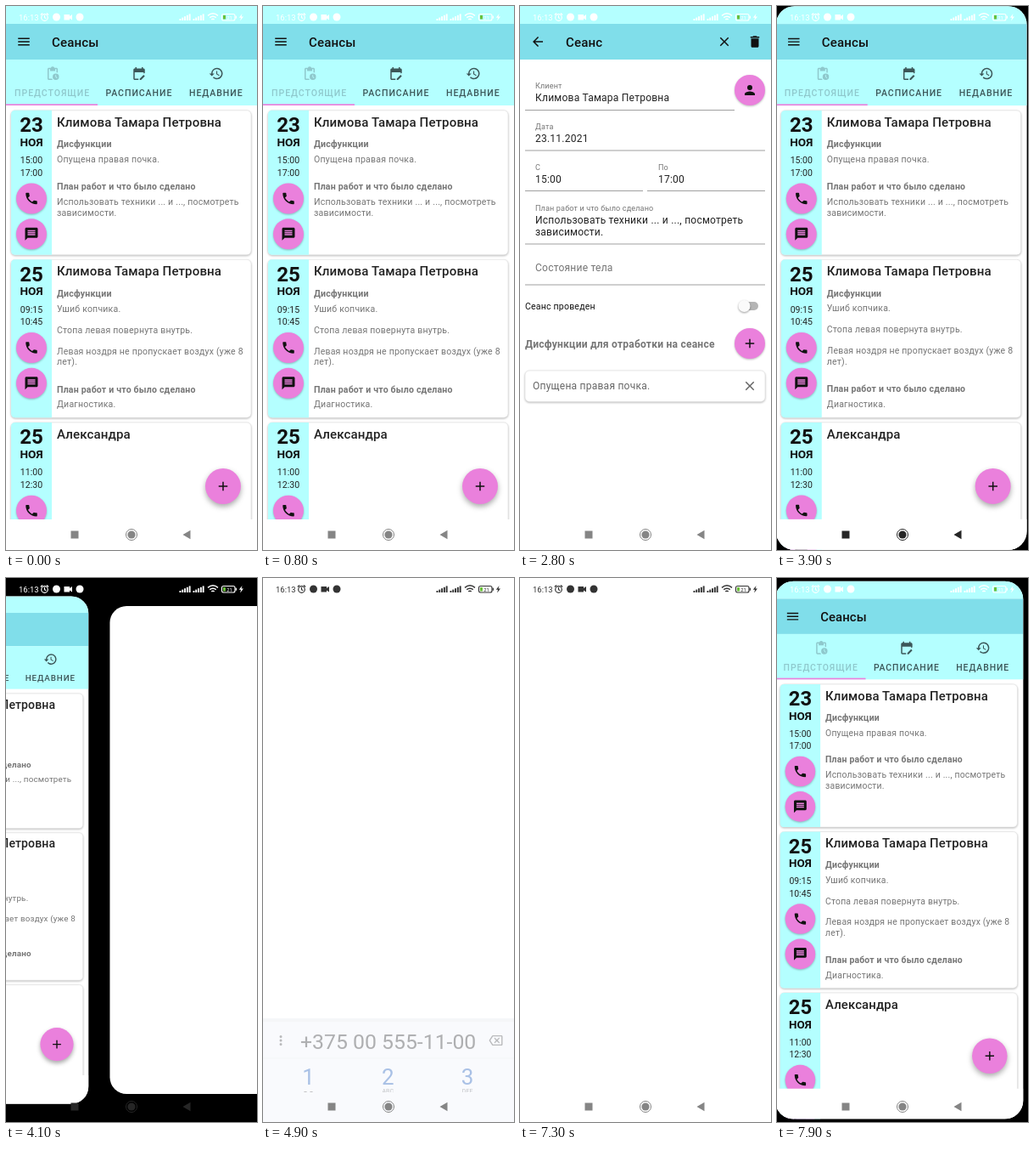
Animation, 296 px wide and 640 px high, one loop 8 s. Source, as an HTML page:

```html
<!DOCTYPE html>
<html lang="ru">
<head>
<meta charset="utf-8">
<title>Сеансы</title>
<style>
  html, body { margin: 0; width: 100%; height: 100%; overflow: hidden; background: #000; }
  #stage { position: relative; width: 296px; height: 640px; overflow: hidden; background: #000; }
  .window { position: absolute; inset: 0; overflow: hidden; background: #fff; }
  svg { position: absolute; left: 0; top: 0; }
  text { font-family: Roboto, sans-serif; letter-spacing: .018em; white-space: pre; }
  .plain, .mid { letter-spacing: 0; }
  .mid { text-anchor: middle; }
  .bold { font-weight: 700; }
  .title { font-weight: 500; letter-spacing: .0075em; }
  .tab { font-weight: 500; letter-spacing: .089em; }
  .card { fill: #fff; stroke: #ddd; stroke-width: .6; filter: drop-shadow(0 1px 1px #0004); }
  .round { fill: #ea80dc; filter: drop-shadow(0 1px 1px #0004); }
  .fab { filter: drop-shadow(0 3px 3px #0005); }
</style>
</head>
<body>
<div id="stage">
  <div class="window" id="app">
    <svg id="list" width="296" height="640"></svg>
    <svg id="session" width="296" height="640"></svg>
  </div>
  <div class="window" id="dialer"><svg id="dial" width="296" height="640"></svg></div>
  <svg id="system" width="296" height="640"></svg>
</div>
<script>
const LOOP = 8000, SHRINK = .105;
const CYAN = '#80deea', LIGHT = '#b4ffff', PINK = '#ea80dc', GREY = '#757575', BLUE = '#1a5abc';
const SMALL = 10.55, BODY = 12.06, TITLE = 15.07;
const CLIENT = 'Климова Тамара Петровна';
const PLAN = ['Использовать техники ... и ..., посмотреть', 'зависимости.'];
const PLAN_LABEL = 'План работ и что было сделано';

const ICONS = {
  call: 'M6.62 10.79c1.44 2.83 3.76 5.14 6.59 6.59l2.2-2.2c.27-.27.67-.36 1.02-.24 1.12.37 2.33.57 3.57.57.55 0 1 .45 1 1V20c0 .55-.45 1-1 1-9.39 0-17-7.61-17-17 0-.55.45-1 1-1h3.5c.55 0 1 .45 1 1 0 1.25.2 2.45.57 3.57.11.35.03.74-.25 1.02z',
  chat: 'M20 2H4c-1.1 0-2 .9-2 2v18l4-4h14c1.1 0 2-.9 2-2V4c0-1.1-.9-2-2-2zm-2 12H6v-2h12zm0-3H6V9h12zm0-3H6V6h12z',
  chatLine: 'M4 4h16v12H5.2L4 17.2zM4 2c-1.1 0-2 .9-2 2v18l4-4h14c1.1 0 2-.9 2-2V4c0-1.1-.9-2-2-2zM6 12h12v2H6zm0-3h12v2H6zm0-3h12v2H6z',
  menu: 'M3 18h18v-2H3zm0-5h18v-2H3zm0-7v2h18V6z',
  back: 'M20 11H7.83l5.59-5.59L12 4l-8 8 8 8 1.41-1.41L7.83 13H20z',
  close: 'M19 6.41 17.59 5 12 10.59 6.41 5 5 6.41 10.59 12 5 17.59 6.41 19 12 13.41 17.59 19 19 17.59 13.41 12z',
  trash: 'M6 19c0 1.1.9 2 2 2h8c1.1 0 2-.9 2-2V7H6zM19 4h-3.5l-1-1h-5l-1 1H5v2h14z',
  person: 'M12 12a4 4 0 1 0 0-8 4 4 0 0 0 0 8zm0 2c-2.67 0-8 1.34-8 4v2h16v-2c0-2.66-5.33-4-8-4z',
  addPerson: 'M9 4a4 4 0 1 0 0 8 4 4 0 0 0 0-8zm0 2a2 2 0 1 1 0 4 2 2 0 0 1 0-4zM1 20v-2c0-2.66 5.33-4 8-4s8 1.34 8 4v2zm2-2h12c-.2-.7-3.3-2-6-2s-5.8 1.3-6 2zM18 7h2v3h3v2h-3v3h-2v-3h-3v-2h3z',
  plus: 'M19 13h-6v6h-2v-6H5v-2h6V5h2v6h6z',
  history: 'M13 3a9 9 0 0 0-9 9H1l4 4 4-4H6a7 7 0 1 1 2.06 4.94l-1.42 1.42A9 9 0 1 0 13 3zm-1 5v5l4.28 2.54.72-1.21-3.5-2.08V8z',
  calendar: 'M19 4h-1V2h-2v2H8V2H6v2H5c-1.1 0-2 .9-2 2v14c0 1.1.9 2 2 2h6v-2H5V10h14v2l2-1V6c0-1.1-.9-2-2-2zM13 20l6-6 2 2-6 6h-2z',
  pending: 'M17 12a5 5 0 1 0 0 10 5 5 0 0 0 0-10zm1.65 7.35L16.5 17.2V14h1v2.79l1.85 1.85zM18 3h-3.18a3 3 0 0 0-5.64 0H6c-1.1 0-2 .9-2 2v15c0 1.1.9 2 2 2h6.11A6.7 6.7 0 0 1 10.68 20H6V5h2v3h8V5h2v5.08c.71.1 1.38.31 2 .6V5c0-1.1-.9-2-2-2z',
  erase: 'M22 3H7c-.7 0-1.2.35-1.6.9L0 12l5.4 8.1c.4.5.9.9 1.6.9h15c1.1 0 2-.9 2-2V5c0-1.1-.9-2-2-2zm0 16H7.07L2.4 12l4.66-7H22zm-11.6-2 3.6-3.6 3.6 3.6 1.4-1.4-3.6-3.6L19 8.4 17.6 7 14 10.6 10.4 7 9 8.4l3.6 3.6L9 15.6z',
  dots: 'M12 8a2 2 0 1 0 0-4 2 2 0 0 0 0 4zm0 2a2 2 0 1 0 0 4 2 2 0 0 0 0-4zm0 6a2 2 0 1 0 0 4 2 2 0 0 0 0-4z',
};

const $ = id => document.getElementById(id);
const text = (x, y, size, str, fill = '#222', cls = '') =>
  `<text x="${x}" y="${y}" font-size="${size}" fill="${fill}" class="${cls}">${str}</text>`;
const rect = (x, y, w, h, fill, extra = '') =>
  `<rect x="${x}" y="${y}" width="${w}" height="${h}" fill="${fill}" ${extra}/>`;
const icon = (name, x, y, fill = '#111', size = 18) =>
  `<path d="${ICONS[name]}" fill="${fill}" transform="translate(${x - size / 2} ${y - size / 2}) scale(${size / 24})"/>`;
const button = (name, x, y, r = 18, cls = '') =>
  `<circle class="round ${cls}" cx="${x}" cy="${y}" r="${r}"/>` + icon(name, x, y);
const cardBox = (y, h) => `<rect class="card" x="6" y="${y}" width="283" height="${h}" rx="5"/>`;
const toolbar = (name, title) => rect(0, 0, 296, 21, LIGHT) + rect(0, 21, 296, 42, CYAN) +
  icon(name, 21, 42) + text(54, 48, TITLE, title, '#111', 'title');

// Session list
function sessionCard(top, height, day, from, to, name, notes = []) {
  const column = `<path fill="${LIGHT}" d="M54 ${top}H11q-5 0-5 5v${height - 10}q0 5 5 5h43z"/>`;
  const lines = notes.map(([dy, str, cls]) => text(60, top + dy + 3.7, SMALL, str, GREY, cls));
  return cardBox(top, height) + column +
    text(30, top + 25.3, 24.1, day, '#111', 'mid bold') +
    text(30, top + 42, 13.56, 'НОЯ', '#111', 'mid bold') +
    text(30, top + 62.4, SMALL, from, '#222', 'mid') + text(30, top + 77, SMALL, to, '#222', 'mid') +
    button('call', 30, top + 103.7) + button('chat', 30, top + 145.5) +
    text(60, top + 19, TITLE, name, '#222', 'title') + lines.join('');
}
const tab = (name, label, iconX, x, fill) => icon(name, iconX, 79.5, fill) + text(x, 106.2, SMALL, label, fill, 'tab');

$('list').innerHTML =
  sessionCard(122.8, 170, 23, '15:00', '17:00', CLIENT, [
    [39.5, 'Дисфункции', 'bold'], [57.5, 'Опущена правая почка.'],
    [89.7, PLAN_LABEL, 'bold'], [107.4, PLAN[0]], [120.3, PLAN[1]]]) +
  sessionCard(298.3, 186, 25, '09:15', '10:45', CLIENT, [
    [39.7, 'Дисфункции', 'bold'], [57.5, 'Ушиб копчика.'], [82.5, 'Стопа левая повернута внутрь.'],
    [107.5, 'Левая ноздря не пропускает воздух (уже 8'], [120.3, 'лет).'],
    [152.5, PLAN_LABEL, 'bold'], [170.3, 'Диагностика.']]) +
  sessionCard(490, 180, 25, '11:00', '12:30', 'Александра') +
  rect(0, 604, 296, 36, '#fff') +
  toolbar('menu', 'Сеансы') + rect(0, 63, 296, 54, LIGHT) +
  tab('pending', 'ПРЕДСТОЯЩИЕ', 55, 10, '#8fc8cc') +
  tab('calendar', 'РАСПИСАНИЕ', 157, 117.5, '#3c5658') +
  tab('history', 'НЕДАВНИЕ', 248, 216, '#3c5658') +
  rect(0, 115.3, 108, 1.7, PINK) + button('plus', 256, 565, 21, 'fab');

// Session form
const line = (x1, x2, y) => rect(x1, y - .4, x2 - x1, .8, '#888');
const label = (x, y, str) => text(x, y, 9.04, str, GREY);
const floating = (id, str) => `<g id="${id}">${text(0, 0, BODY, str, GREY)}</g>`;

$('session').innerHTML = rect(0, 0, 296, 640, '#fff') +
  toolbar('back', 'Сеанс') + '<circle id="ripple" cx="21" cy="42"/>' +
  icon('close', 241, 42) + icon('trash', 277, 42) +
  floating('clientLabel', 'Клиент') + `<g id="client">${text(18, 112, BODY, CLIENT)}</g>` +
  line(6, 253, 122.5) + button('person', 271, 99) +
  label(18, 144.8, 'Дата') + text(18, 159.8, BODY, '23.11.2021') + line(6, 289, 170) +
  label(18, 192.6, 'С') + text(18, 207.8, BODY, '15:00') + line(6, 145, 217.5) +
  label(163, 192.6, 'По') + text(163, 207.8, BODY, '17:00') + line(150, 289, 217.5) +
  floating('planLabel', PLAN_LABEL) +
  text(18, 255.8, BODY, PLAN[0]) + text(18, 270, BODY, PLAN[1]) + line(6, 289, 280) +
  text(18, 311.6, BODY, 'Состояние тела', GREY) + line(6, 289, 328) +
  text(6, 356.8, SMALL, 'Сеанс проведен', '#111') +
  rect(259, 348, 22, 10, '#b5b5b5', 'rx="5"') +
  '<circle cx="264.5" cy="353" r="7" fill="#fafafa" style="filter:drop-shadow(0 1px 1px #0006)"/>' +
  text(6, 401.7, BODY, 'Дисфункции для отработки на сеансе', GREY, 'bold') + button('plus', 271, 397) +
  `<g id="item">${cardBox(429, 36.5) + text(15, 451.2, BODY, 'Опущена правая почка.', '#666') + icon('close', 271, 447, '#666')}</g>`;

// Dialer
const LATIN = ['', 'ABC', 'DEF', 'GHI', 'JKL', 'MNO', 'PQRS', 'TUV', 'WXYZ'];
const CYRILLIC = ['', 'АБВГ', 'ДЕЁЖЗ', 'ИЙКЛ', 'МНОП', 'РСТУ', 'ФХЦЧ', 'ШЩЪЫ', 'ЬЭЮЯ'];
const key = (_, i) => {
  const x = 53.5 + i % 3 * 93.8, y = 374 + Math.floor(i / 3) * 48;
  return text(x, y + 9, 26, i + 1, BLUE, 'mid') +
    text(x, y + 18.6, 7, LATIN[i], '#5f6368', 'mid') + text(x, y + 26.6, 7, CYRILLIC[i], '#5f6368', 'mid');
};
const action = (name, str, y) => icon(name, 30, y, BLUE) + text(60, y + 4.2, BODY, str, BLUE, 'plain');

$('dial').innerHTML =
  `<g id="actions">${action('addPerson', 'Создать контакт', 39.5)}${action('addPerson', 'Добавить к контакту', 75.5)}${action('chatLine', 'Отправить сообщение', 111.5)}</g>` +
  `<g class="pad">${rect(0, 305, 296, 5, '#e4e8ee')}${rect(0, 309, 296, 340, '#f0f4fb')}${rect(0, 351.5, 296, .8, '#dde2ea')}</g>` +
  `<svg width="296" height="605"><g class="pad">
    ${icon('dots', 21, 331, '#444')}${text(44, 341, 24.8, '+375 00 555-11-00', '#2a2a2a', 'plain')}${icon('erase', 274.5, 331, '#444', 16)}
    ${LATIN.map(key).join('')}
    <path d="M50 395.5h7" stroke="#444" stroke-width="1.2"/>
    <g fill="none" stroke="#444" stroke-width="1.2"><circle cx="50" cy="393.5" r="2"/><circle cx="57" cy="393.5" r="2"/></g>
    ${text(53.5, 532, 23, '*', '#444', 'mid')}${text(147.3, 527, 26, 0, BLUE, 'mid')}
    ${text(147.3, 540, 7, '+', '#5f6368', 'mid')}${text(241, 528.5, 18.5, '#', '#444', 'mid')}
    ${rect(93, 553, 109, 43, '#1e8e3e', 'rx="21.5"')}${icon('call', 114, 574.5, '#fff')}
    ${text(132, 578.4, SMALL, 'Позвонить', '#fff', 'title')}
  </g></svg>`;

// Status and navigation bars
const bars = x => [0, 1, 2, 3, 4].map(i => rect(x + i * 2.8, 15 - i * 1.4, 1.9, 2 + i * 1.4, 'currentColor')).join('');
$('system').innerHTML = `<g id="status" fill="currentColor">
    ${text(15, 16.6, 9.5, '16:13', 'currentColor', 'plain')}
    <g fill="none" stroke="currentColor" stroke-width="1.2">
      <circle cx="45.5" cy="13.5" r="3.8"/><path d="M45.5 11v2.7l1.8 1M40.8 10.5l2.3-2M50.2 10.5l-2.3-2"/>
      <path stroke-width="1.5" d="M238 11.3q6-5 12 0M240.2 13.7q3.8-3 7.6 0M242.3 15.9q1.7-1.2 3.4 0"/>
      <rect x="254.5" y="9.5" width="15.5" height="7.5" rx="2"/>
    </g>
    <circle cx="59.5" cy="13" r="4.5"/><circle cx="87" cy="13" r="4.5"/>
    <path d="M68.5 10H75v2l3-2v6.5l-3-2v2h-6.5zM278.5 9l-3.7 4.7h2.3l-1 3.8 3.9-5h-2.4z"/>
    ${bars(204.5)}${bars(220.5)}${rect(256, 11, 3, 4.5, '#6abf3a')}${rect(270.7, 11.7, 1.3, 3, 'currentColor')}
    ${text(263.5, 15.6, 6, '21', 'currentColor', 'mid')}
  </g>
  <g id="nav" fill="currentColor">${rect(76.5, 617.5, 9, 9, 'currentColor')}
    <circle cx="148" cy="622" r="4.6"/><circle cx="148" cy="622" r="6.5" fill="none" stroke="currentColor"/>
    <path d="M208.5 622l9-5.2v10.4z"/>
  </g>`;

// Motion
const span = (t, start, length) => Math.min(1, Math.max(0, (t - start) / length));
const easeOut = (x, power) => 1 - (1 - x) ** power;
const smooth = x => x * x * (3 - 2 * x);
const show = (el, on) => { el.style.display = on ? '' : 'none'; };

function place(el, shift, scale, moving) {
  el.style.transform = `translateX(${shift}px) scale(${scale})`;
  el.style.borderRadius = moving ? '22px' : '0';
}

// Slides one window out and the next one in; dir is 1 when the next comes from the right.
function switchWindows(leaving, entering, x, dir) {
  const p = easeOut(x, 3), grow = easeOut(span(x, .28, .72), 2), moving = x > 0 && x < 1;
  place(leaving, -dir * 296 * p, 1 - SHRINK * p, moving);
  place(entering, dir * 296 * (1 - p), 1 - SHRINK * (1 - grow), moving);
}

function floatLabel(id, p, restY, topY) {
  $(id).setAttribute('transform', `translate(18 ${restY + (topY - restY) * p}) scale(${1 - .25 * p})`);
}

function draw(t) {
  show($('session'), t >= 1000 && t < 3300);
  floatLabel('planLabel', smooth(span(t, 1110, 175)), 259.5, 241);
  floatLabel('clientLabel', smooth(span(t, 1240, 175)), 105.5, 97);
  show($('client'), t >= 1240);
  $('item').style.opacity = span(t, 1250, 120);
  $('ripple').setAttribute('r', 6 + 8 * easeOut(span(t, 2950, 200), 2));
  $('ripple').style.opacity = t < 3000 ? 0 : .14 * (1 - span(t, 3100, 200));

  const opening = span(t, 3900, 700), closing = span(t, 7405, 650);
  if (t < 7405) switchWindows($('app'), $('dialer'), opening, 1);
  else switchWindows($('dialer'), $('app'), closing, -1);

  const up = easeOut(span(t, 4820, 400), 2) - span(t, 6600, 300) ** 2;
  for (const part of document.querySelectorAll('.pad')) {
    part.setAttribute('transform', `translate(0 ${335 * (1 - up)})`);
    part.style.opacity = up;
  }
  $('actions').style.opacity = span(t, 5250, 150) - span(t, 6600, 150);

  $('status').style.color = t >= 4380 && t < 7405 ? '#333' : '#fff';
  const dark = (t >= 3900 && t < 4380) || (t >= 7405 && t < 7700);
  $('nav').style.color = dark ? '#262626' : '#858585';
}

function tick() {
  draw(performance.now() % LOOP);
  requestAnimationFrame(tick);
}
tick();
</script>
</body>
</html>
```
